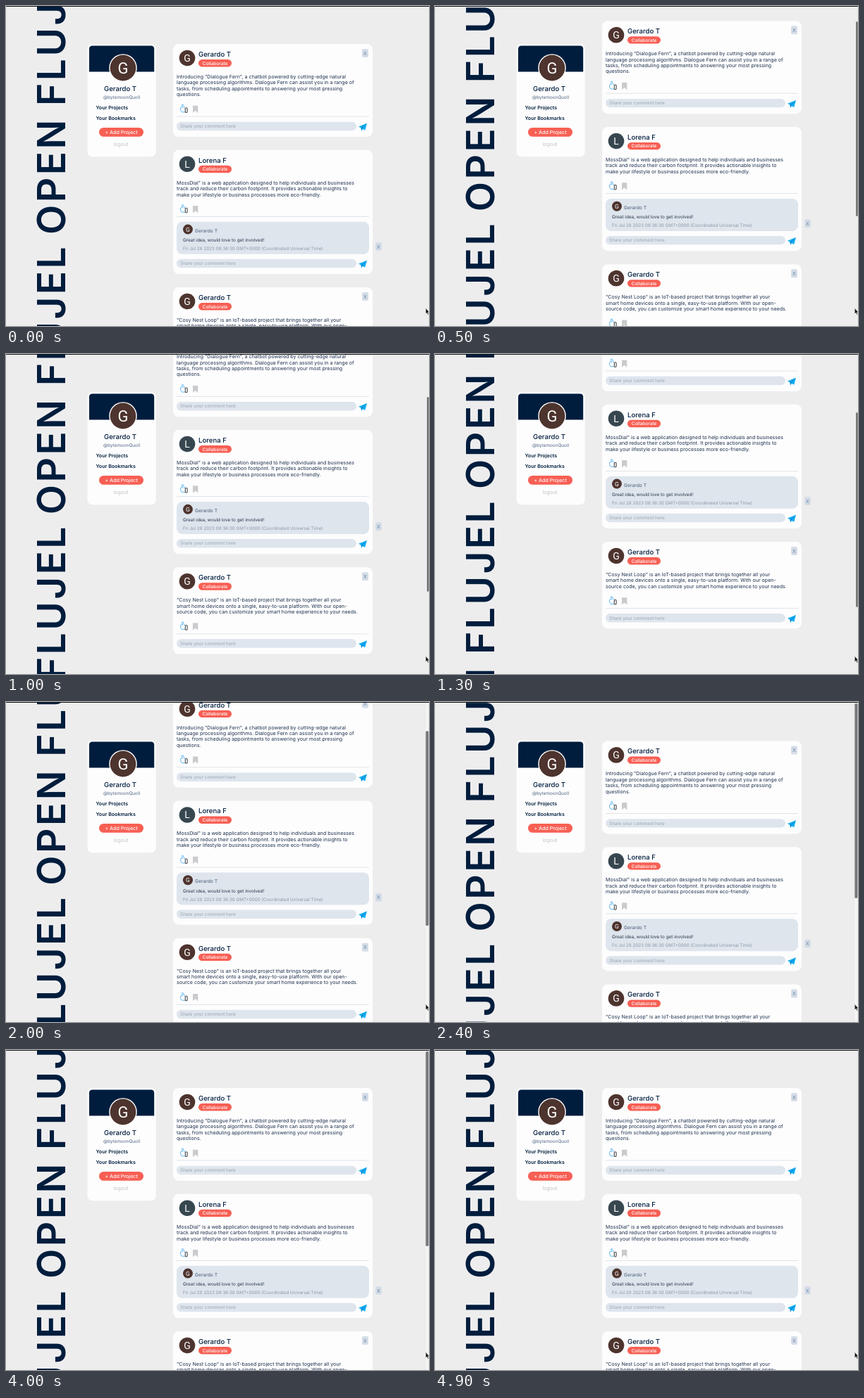
These frames come from a looping animation (600 px wide and 455 px high, 5 s). An HTML page:

```html
<!DOCTYPE html>
<html lang="en">
<head>
<meta charset="utf-8">
<title>Project feed</title>
<style>
  html, body { margin: 0; width: 100%; height: 100%; overflow: hidden; background: #eeedee; }
  svg { display: block; width: 600px; height: 455px; font-family: Inter, sans-serif; text-rendering: geometricPrecision; }
  .initial { font-family: Roboto, sans-serif; }
</style>
</head>
<body>
<svg id="stage" viewBox="0 0 600 455"></svg>
<script>
const NAVY = '#001d3d', CORAL = '#f75f54', BROWN = '#4e342e', SLATE = '#37474f', PALE = '#dee5ed';
const MAIN_USER = 'Gerardo T';

const text = (x, y, size, str, fill = NAVY, weight = 400, anchor = 'start') =>
  `<text x="${x}" y="${y}" font-size="${size}" fill="${fill}" font-weight="${weight}" text-anchor="${anchor}">${str}</text>`;
const box = (x, y, w, h, r, fill) =>
  `<rect x="${x}" y="${y}" width="${w}" height="${h}" rx="${r}" fill="${fill}"/>`;
const avatar = (x, y, r, letter, fill, size) =>
  `<circle cx="${x}" cy="${y}" r="${r}" fill="${fill}"/>
   <g class="initial">${text(x, y + size * .355, size, letter, '#fff', 400, 'middle')}</g>`;
const closeButton = (x, y) =>
  box(x, y, 9, 12, 2, '#d5dde7') + text(x + 4.5, y + 8.6, 7, 'X', '#6682a6', 400, 'middle');

const icons = y => `
  <g transform="translate(0 ${y})" fill="none" stroke-linejoin="round">
    <path d="M254 4.6H249.6Q248.4 4.4 248.2 3L247.4 -.6Q247.4 -1.8 248.6 -1.8H250.4L249.5 -5Q249.6 -6.6 251 -6L253 -1.9L254 -1.2" stroke="#4aaef0" stroke-width=".9"/>
    <rect x="254.3" y="-1.2" width="2.8" height="6.4" rx=".4" stroke="#222" stroke-width=".9"/>
    <path d="M265 -4.5H272.3V5.8L268.65 2.6L265 5.8Z" fill="#cacbcd"/>
  </g>`;
const plane = y => `
  <g transform="translate(500 ${y})">
    <path d="M0 -.3L12 -5L9.3 5L5.8 3.2L4.2 5.8L3.5 1.8Z" fill="#14aef3"/>
    <path d="M3.5 1.8L12 -5L5.2 2.9L4.2 5.8Z" fill="#0d8bd2"/>
  </g>`;
const comment = y => box(242, y, 273, 46, 8, PALE)
  + avatar(258, y + 10.8, 7, 'G', BROWN, 8.5)
  + text(268, y + 15, 6.7, MAIN_USER, '#5b6d86', 500)
  + text(251, y + 28.3, 6.4, 'Great idea, would love to get involved!', '#26354a')
  + text(251, y + 40.2, 6.3, 'Fri Jul 28 2023 08:36:30 GMT+0000 (Coordinated Universal Time)', '#8d97a6')
  + closeButton(524, y + 29.3);

function card(top, height, name, color, lines, hasComment) {
  const last = top + 49 + (lines.length - 1) * 8.4;
  const input = top + height - 15;
  return box(237, top, 283, height, 8, '#fdfdfe')
    + avatar(257, top + 20, 11.3, name[0], color, 14)
    + text(273, top + 18, 9.6, name, NAVY, 500)
    + box(273, top + 22, 47, 10.4, 5.2, CORAL)
    + text(296.5, top + 29.5, 6.5, 'Collaborate', '#fff', 500, 'middle')
    + lines.map((line, i) => text(242, top + 49 + i * 8.4, 7.1, line, '#1b2f4b')).join('')
    + icons(last + 18)
    + box(242, last + 28.4, 273, .9, 0, '#dde1e6')
    + (hasComment ? comment(top + 102) : closeButton(505, top + 7))
    + box(242, input - 6.2, 255, 12.4, 6.2, PALE)
    + text(247, input + 2.2, 6.45, 'Share your comment here', '#98a3b1')
    + plane(input + .8);
}

const banner = (y, word) =>
  `<text transform="translate(84.3 ${y}) rotate(-90)" font-size="55" font-weight="600" letter-spacing="3.5" fill="${NAVY}">${word}</text>`;

const page = [142, 560, 978].map(y => banner(y, 'FLUJEL') + banner(y + 183, 'OPEN')).join('')
  + card(54, 132, MAIN_USER, BROWN, [
      'Introducing "Dialogue Fern", a chatbot powered by cutting-edge natural',
      'language processing algorithms. Dialogue Fern can assist you in a range of',
      'tasks, from scheduling appointments to answering your most pressing',
      'questions.'])
  + card(204.8, 176.2, 'Lorena F', SLATE, [
      'MossDial" is a web application designed to help individuals and businesses',
      'track and reduce their carbon footprint. It provides actionable insights to',
      'make your lifestyle or business processes more eco-friendly.'], true)
  + card(400, 123.3, MAIN_USER, BROWN, [
      '"Cosy Nest Loop" is an IoT-based project that brings together all your',
      'smart home devices onto a single, easy-to-use platform. With our open-',
      'source code, you can customize your smart home experience to your needs.']);

const profile = box(115.5, 54, 97.2, 160.3, 7, '#fdfdfe')
  + `<path d="M118 93.6V61Q118 56.5 122.5 56.5H205.7Q210.2 56.5 210.2 61V93.6Z" fill="${NAVY}"/>`
  + `<circle cx="166" cy="88" r="19.8" fill="#fff"/>`
  + avatar(166, 88, 18.4, 'G', BROWN, 22)
  + text(162, 121, 9.6, MAIN_USER, NAVY, 500, 'middle')
  + text(164, 132, 6.4, '@bytemoonQuoll', '#4f6482', 400, 'middle')
  + text(127.5, 147, 7.1, 'Your Projects', NAVY, 600)
  + text(127.5, 162, 7.1, 'Your Bookmarks', NAVY, 600)
  + box(132, 173, 63, 12.8, 6.4, CORAL)
  + text(163.5, 182, 7.1, '+ Add Project', '#fff', 500, 'middle')
  + text(163, 198.6, 7, 'logout', '#bfc1c5', 400, 'middle');

document.getElementById('stage').innerHTML = `
  <rect width="600" height="455" fill="#eeedee"/>
  <g id="page">${page}</g>
  ${profile}
  <g id="bar">
    <rect id="track" x="594.3" width="5.7" height="455" fill="#f5f4f5" stroke="#e2e1e2" stroke-width=".5"/>
    <rect id="thumb" height="277" rx="1.7" fill="#777678"/>
  </g>
  <rect width="600" height="1" fill="#161616"/>
  <path d="M595.3 429.5V437.8L597.1 436.2L598.4 439L599.7 438.4L598.4 435.7H600.5Z" fill="#111" stroke="#fff" stroke-width=".5"/>`;

const [pageEl, bar, track, thumb] = ['page', 'bar', 'track', 'thumb'].map(id => document.getElementById(id));

// time in ms, scroll in px, speed in px/ms
const scrollKeys = [[0, 0, 0], [700, 57.5, .13], [1300, 133, .11], [1500, 144, 0],
  [2000, 64.3, -.21], [2400, -1.4, 0], [2800, 0, 0], [5000, 0, 0]];

function scrollAt(t) {
  const i = scrollKeys.findIndex(key => key[0] > t);
  const [t0, y0, v0] = scrollKeys[i - 1], [t1, y1, v1] = scrollKeys[i];
  const d = t1 - t0, u = (t - t0) / d, w = 1 - u;
  return w * w * ((1 + 2 * u) * y0 + u * d * v0) + u * u * ((3 - 2 * u) * y1 - w * d * v1);
}

const clamp = v => Math.max(0, Math.min(1, v));

function draw(now) {
  const t = Math.floor(now % 5000 / 100) * 100;
  const scroll = scrollAt(t), wide = t >= 1800;
  pageEl.setAttribute('transform', `translate(0 ${-scroll})`);
  bar.setAttribute('opacity', Math.min(clamp(t / 200), clamp((4500 - t) / 400)));
  track.setAttribute('opacity', wide ? 1 : 0);
  thumb.setAttribute('x', wide ? 595.4 : 597);
  thumb.setAttribute('width', wide ? 4 : 2.8);
  thumb.setAttribute('y', 2 + Math.max(0, scroll) * .609);
  requestAnimationFrame(draw);
}
draw(performance.now());
</script>
</body>
</html>
```
